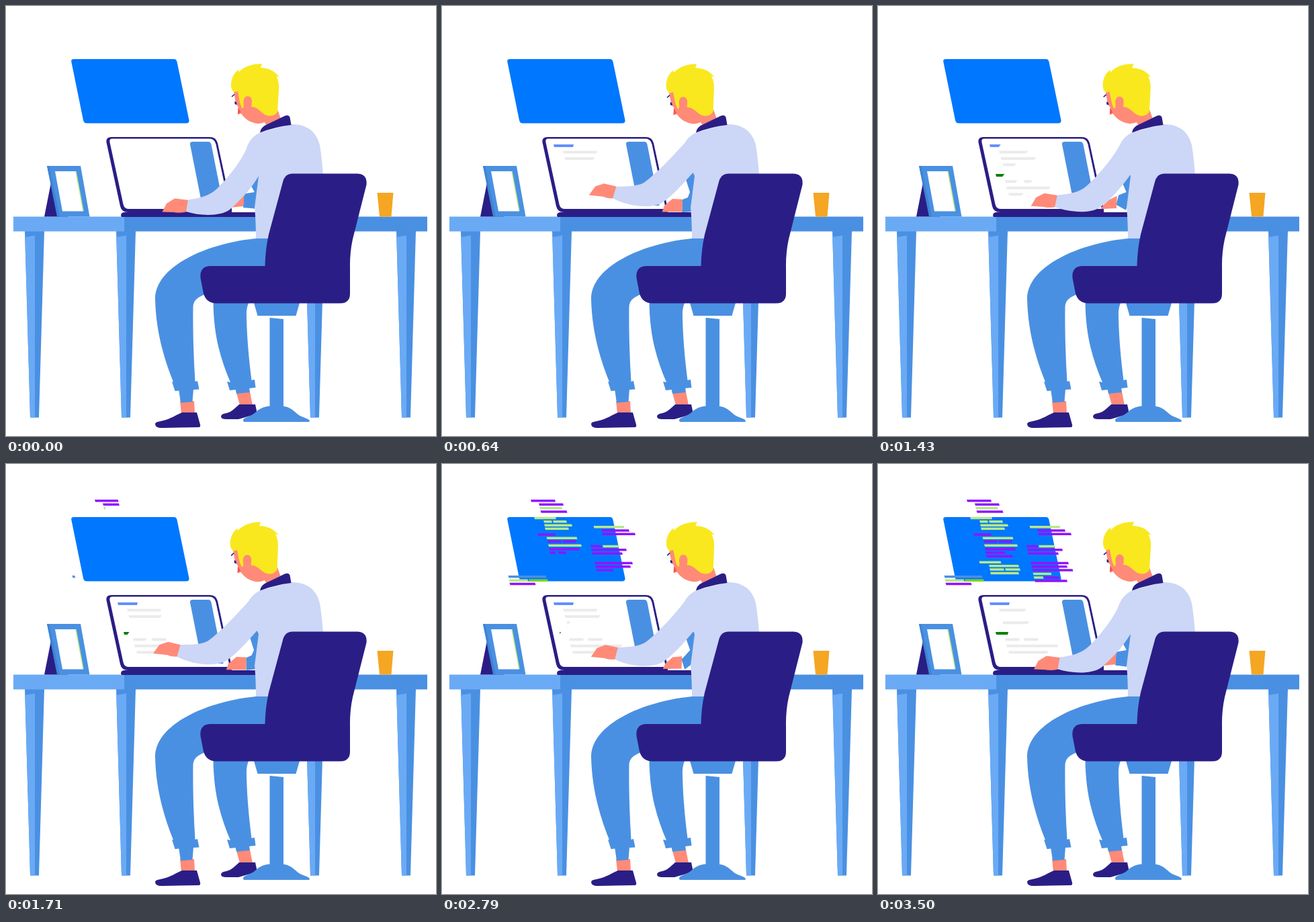
Animation, 640 px wide and 640 px high, one loop 3.57 s. Source, as an HTML page:

```html
<!DOCTYPE html>
<html lang="en">
<head>
<meta charset="utf-8">
<title>Working at a desk</title>
<style>
html, body { margin: 0; height: 100%; overflow: hidden; background: #fff }
svg { display: block; width: 100vw; height: 100vh }
.navy { fill: #2a1e86 }
.blue { fill: #4a90e2 }
.light { fill: #6aaaf5 }
.skin { fill: #ff8a78 }
.shirt { fill: #ccd6f6 }
.hair { fill: #f9e81e }
</style>
</head>
<body>
<svg viewBox="0 0 640 640">
  <defs>
    <g id="leg">
      <path class="blue" d="M28 335H57L49 612.500H36Z"/>
      <path class="light" d="M28.300 344L43 341.500V612.500H36Z"/>
    </g>
  </defs>
  <path fill="#07f" d="M101 79H250Q253.500 79 254.500 83L272.500 170Q273 174.500 268.500 174.500H120Q116 174.500 115 170L97.300 83Q96.500 79 101 79Z"/>

  <use href="#leg"/>
  <use href="#leg" x="136"/>
  <use href="#leg" x="417"/>
  <use href="#leg" x="553"/>
  <path class="blue" d="M176 313.500H627V335.500H176Z"/>
  <path class="light" d="M11 313.500H176V335.500H11Z"/>

  <path class="navy" d="M67 263L57 313.500H92L78 300Z"/>
  <path class="blue" d="M61 238H111L124.500 313.500H77Z"/>
  <path fill="#3f83d3" d="M61 238H64L80 313.500H76Z"/>
  <path fill="#fff" d="M73 246H104L115 305.500H84Z"/>
  <path fill="none" stroke="#b8e986" stroke-width="1.500" d="M104 246L115 305"/>
  <path fill="#f5a623" d="M552.500 278H576.500L573.500 313.500H556Z"/>

  <path class="navy" d="M157 195H303Q312.500 195 315 204L336 302V307H182Q172 307 170 298L149.500 203Q148.500 195 157 195Z"/>
  <path fill="#fff" d="M158 197.500H303Q310.500 197.500 312.500 206L333 302H182Q176 302 174.500 295L154.500 203Q153.500 197.500 158 197.500Z"/>
  <path class="navy" d="M171 312Q171 307 177 307H373V314H172Z"/>
  <path class="blue" d="M278 202H301Q304.500 202 305.500 206L323.500 297H292L274 206Q273.500 202 278 202Z"/>
  <g id="lines"></g>

  <path id="farArm" class="blue"/>
  <path id="farHand" class="skin"/>
  <path class="shirt" d="M357 215C361 202 366 194 379 188L424 176C450 175 463 190 467 207Q470 225 472 252L420 350H372Q372 320 370 300L376 253Z"/>

  <path class="skin" d="M343 576L363 574L367 594H348Z"/>
  <path class="blue" d="M341 568H362L363 575L343 577Z"/>
  <path class="blue" d="M308.500 440H362C357 450 358 460 358 465C359 500 362 530 365.500 557L370 556L371.500 568L333 572L329 559L334 560C319 525 309 490 308.500 440Z"/>
  <path class="navy" d="M320 611Q320 607 328 606C337 604 342 597 347 593H371L374 607L346 615H328Q320 615 320 611Z"/>
  <path class="skin" d="M259 588H280L281 607H261Z"/>
  <path class="blue" d="M257 570H279L277.500 589L260 590.500Z"/>
  <path class="blue" d="M372 346C300 353 222 387 222 436C223 480 233 520 249 559.500L247 559L251.500 573L287.500 570.500L285 558L281.500 559C279 520 278 480 278.500 447Q279 435 297 429L400 400V346Z"/>
  <path class="navy" d="M222 622Q222 619 230 618C245 615 254 608 262 605H284L289 623Q290 627 286 627L232 628Q222 628 222 622Z"/>

  <path class="blue" d="M369 442H437L431.500 461H374.500Z"/>
  <path class="blue" d="M392.500 464L413 466V600H392.500Z"/>
  <path class="blue" d="M353 617C353 612 362 612 370 606C378 598 386 595.500 395 595.500H410C424 596 429 604 436 609C442 613 452 614 452 618Q452 619 450 619H355Q353 619 353 617Z"/>
  <path class="navy" d="M426 249.500H523Q538 250 536.500 266L516 347Q511.500 368 512 390V428Q512 442.500 497 442.500H313Q298 442 294 428L289.500 405Q288 388 303 387H385.500Q386 362 391 340L412 262Q415 249.500 426 249.500Z"/>

  <path id="hand" class="skin"/>
  <path id="arm" class="shirt"/>

  <path class="skin" d="M380 165L404 154L409 168L388 178Z"/>
  <g id="head">
    <path class="skin" d="M339 127L349 125L385 150L390 170C384 174 379 175 375 175C364 174 355 168 350 160L345 161.500L346 151L342 145Z"/>
    <path class="hair" d="M335 118C335 107 340 99 346.500 94.500V98.500C355 89 368 86 381 86L379 92C391 92 400 97 407 106L402.500 104.500C406 112 406.500 118 406 125L404 157C402 162 396 164 391 163.500C382 163 376 150 366 150L351.500 152C347 144 347 135 345 127L339.500 128.500C336 125 335 122 335 118Z"/>
    <path class="skin" d="M353.500 144C353 131 366 132 366 142L365 152L356 158C351 153 355 150 353.500 144Z"/>
    <path fill="none" stroke="#2a1e86" stroke-width="1.600" d="M336 135L340 131.500"/>
    <path class="navy" d="M340.500 142Q343.500 142 343.500 147L340.500 146Z"/>
    <path fill="#f9504f" d="M345.500 151L349.500 158L345 161Z"/>
  </g>
  <path class="navy" d="M378 188.500Q379 182 385 178L415 163.500Q421 161.500 422.500 165.500L424.500 177Q400 180 378 188.500Z"/>
</svg>
<script>
const LOOP = 3570, FRAMES = 50;
const $ = id => document.getElementById(id);
const clamp = v => Math.min(1, Math.max(0, v));

// Each limb blends between its resting and its lifted outline.
const limbs = {
  arm: ['M360 207C352 230 330 256 314 272C303 282 290 286 271 288.5L268 306C290 313 320 313 333 303C350 288 365 272 376 253L385 215Z',
        'M362 203C345 222 320 248 304 260C295 268 280 268 259 268.5L254 286C275 297 305 302 325 294C345 282 362 260 378 243L385 215Z'],
  hand: ['M232.500 306.500L239 294L251 286.500L272 289L269 306C264 308 255 308 250 307Z',
         'M218.500 281L228 268L241 264L260 268.500L255 286C249 286 245 286 240 283.500Z'],
  farArm: ['M377 250L365 268L370 277L354 279.500L353 300L375 302L385 250Z',
           'M379 242L363 258L369 277L366 285L357.500 288L357 307L375 307L385 243Z'],
  farHand: ['M333 300L338 296L345 289L354.500 280L353.500 298Z',
            'M327.500 306.500L331 297L343 287L358 288L357.500 306.500Z']
};

function blend([a, b], k) {
  const to = b.match(/[\d.]+/g);
  let i = 0;
  return a.replace(/[\d.]+/g, n => (+n + (to[i++] - n) * k).toFixed(2));
}

// Text on the laptop: x, y, width, colour, then shown share at each key frame.
const keys = [0, 9, 15, 24, 32, 39, 49];
const grey = '#ebebeb';
const screen = [
  [166, 206, 30, '#638fff', 0, 1, 0, 1, .87, 1, 1],
  [180, 215.500, 51, grey, 0, 1, .66, 1, 0, 1, .8],
  [182.500, 225, 57, grey, 0, .79, 1, .87, .79, .94, 0],
  [185.500, 234.300, 46, grey, 0, 0, 1, 0, 1, .13, .87],
  [175, 250, 19, '#008000', 0, 0, 1, .45, 1, .1, 1],
  [189, 259.300, 22, grey, 0, 0, .7, .95, 1, 1, 1],
  [217, 259.300, 22, grey, 0, 0, .1, 1, 1, 1, 1],
  [191, 268.700, 77, grey, 0, 0, .68, 1, 1, 1, 1],
  [194, 278.300, 59, grey, 0, 0, 0, .7, .89, 1, 1]
];

// Code around the panel: y, colour, x, width; equal y means one row.
const inks = { p: '#9013fe', g: '#b8e986', d: '#7ed321', b: '#4a90e2' };
const main = [
  [53, 'p', 132, 36], [58.400, 'p', 144, 36], [64, 'g', 145, 33], [69.300, 'p', 146.500, 39],
  [78.700, 'g', 137, 32], [84, 'g', 151, 12], [84, 'g', 165, 20], [89.400, 'g', 152, 41],
  [94.500, 'g', 153, 35], [103.200, 'p', 142, 26], [108.600, 'g', 155.500, 45],
  [113.800, 'p', 157, 20], [113.800, 'p', 179, 20], [119.400, 'g', 158, 49], [125, 'p', 159, 45],
  [130.200, 'p', 160, 12], [130.200, 'p', 173, 16], [135.500, 'p', 161, 39],
  [144.400, 'g', 150.500, 32], [150, 'g', 165, 44], [155.200, 'g', 166, 21],
  [155.200, 'g', 189, 22], [160.700, 'g', 167, 42]
];
const side = [
  [92, 'g', 225.500, 45], [97.200, 'p', 237, 41], [102.500, 'p', 238, 49],
  [120.700, 'p', 221, 16], [120.700, 'g', 239, 24], [126, 'p', 222, 52], [131.400, 'p', 223, 45],
  [145.700, 'p', 227, 56], [151, 'p', 228, 53], [156.300, 'p', 229.500, 60],
  [161.700, 'g', 230.500, 27], [167.200, 'g', 231.500, 14], [167.200, 'p', 247, 22],
  [172.300, 'p', 233, 48]
];
const corner = [
  [166, 'b', 98.500, 56], [171.500, 'g', 99.500, 28], [171.500, 'd', 129, 28], [176.700, 'p', 100.500, 38]
];

const bar = (x, y, w, h, color, cut) => w < .3 ? '' :
  `<path fill="${color}" d="M${x} ${y}h${w}L${x + Math.max(.5, w + cut)} ${y + h}H${x + 1}Z"/>`;

function typed(rows, frame, startOf) {
  let row = -1, lastY;
  return rows.map(([y, ink, x, w]) => {
    if (y !== lastY) row++;
    lastY = y;
    const u = clamp((frame - startOf(row)) / 3);
    return bar(x, y, w * u * (2 - u), 3.500, inks[ink], 1);
  }).join('');
}

// Start frame of a row: one pace up to the bend, another after it.
const pace = (first, fast, bend, slow) => i =>
  first + fast * Math.min(i, bend) + slow * Math.max(0, i - bend);

function share(values, frame) {
  let i = keys.findLastIndex(k => k <= frame);
  if (i === keys.length - 1) return values[i];
  return values[i] + (values[i + 1] - values[i]) * (frame - keys[i]) / (keys[i + 1] - keys[i]);
}

function draw(frame) {
  const k = (1 - Math.cos(frame / FRAMES * 6 * Math.PI)) / 2;
  for (const id in limbs) $(id).setAttribute('d', blend(limbs[id], k));
  $('head').setAttribute('transform', `rotate(${-1.300 * k} 395 178)`);
  $('lines').innerHTML =
    screen.map(([x, y, w, color, ...shown]) => {
      const s = share(shown, frame);
      return bar(x, y, w * s, 4, color, s < 1 ? -3 : -1);
    }).join('') +
    typed(main, frame, pace(21.600, 1.140, 9, 1.450)) +
    typed(side, frame, pace(24.900, 1.450, 4, 1.900)) +
    typed(corner, frame, pace(23.900, 1.500, 9, 1.500));
}

let last = -1;
function tick() {
  const t = performance.now() % LOOP;
  const frame = Math.min(FRAMES - 1, Math.floor((t + 4) / (LOOP / FRAMES)));
  if (frame !== last) draw(last = frame);
  requestAnimationFrame(tick);
}
tick();
</script>
</body>
</html>
```
